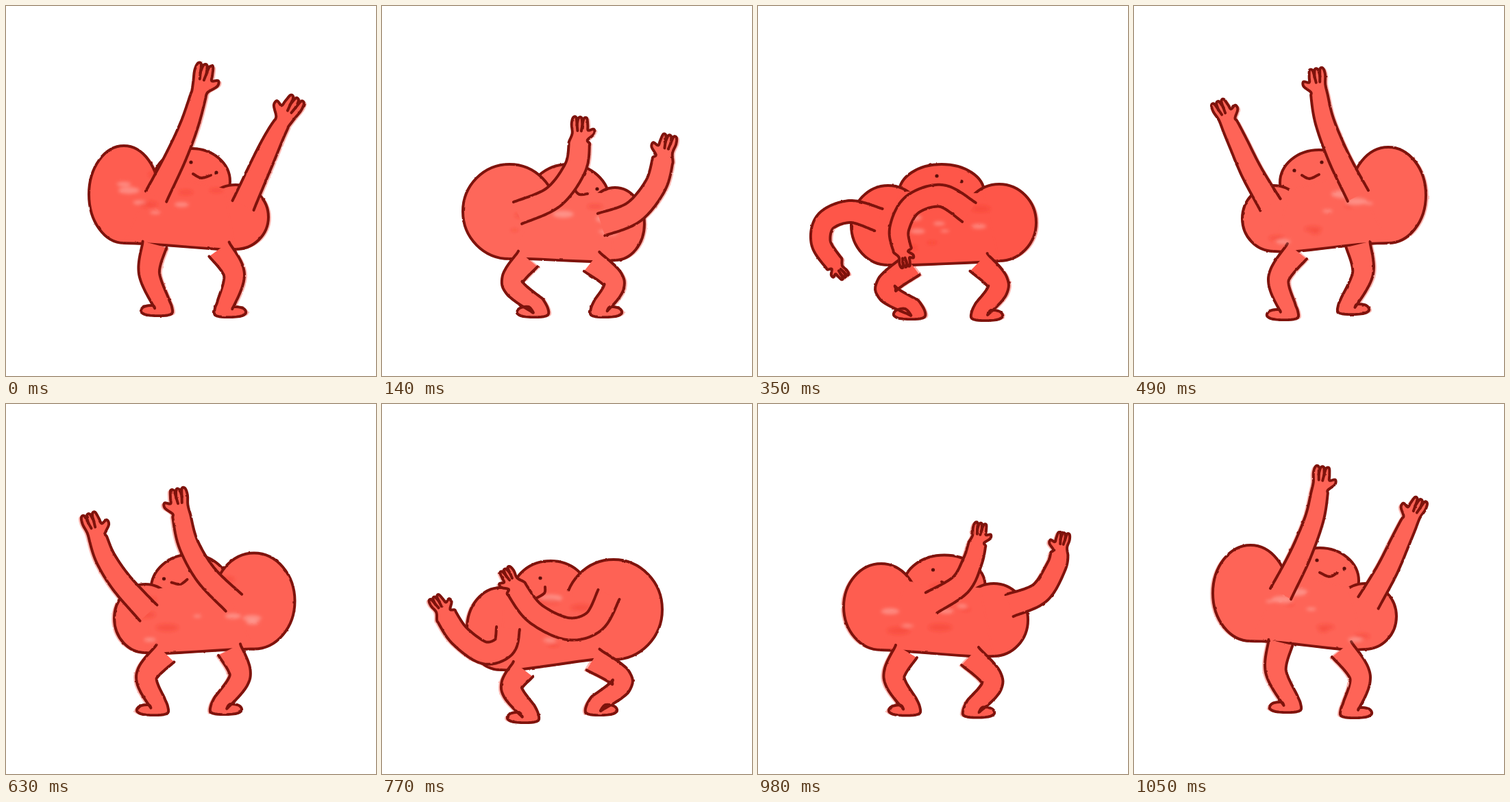
An HTML page that plays this animation: 540x540 px, repeating every 1120 ms.

```html
<!DOCTYPE html>
<html lang="en">
<head>
<meta charset="utf-8">
<title>Dancer</title>
<style>
  html, body { margin: 0; width: 100%; height: 100%; overflow: hidden; background: #fff; }
  svg { display: block; width: 540px; height: 540px; }
  #dancer { animation: flip 1120ms step-end infinite; }
  .pose { visibility: hidden; animation: show 560ms step-end infinite; }
  .ink { stroke: #7e130c; stroke-width: 4; stroke-linecap: round; stroke-linejoin: round; }
  .line { fill: none; }
  .wash { opacity: .45; }
  .light { fill: #fff; opacity: .28; }
  .deep { fill: #ee2e1e; opacity: .3; }
  @keyframes show { 0% { visibility: visible; } 12.5%, 100% { visibility: hidden; } }
  @keyframes flip { 0% { transform: none; } 50%, 100% { transform: translateX(541px) scaleX(-1); } }
</style>
</head>
<body>
<svg viewBox="0 0 540 540">
  <defs>
    <filter id="rough" filterUnits="userSpaceOnUse" x="0" y="0" width="540" height="540" color-interpolation-filters="sRGB">
      <feTurbulence type="fractalNoise" baseFrequency=".12" numOctaves="2" seed="4"/>
      <feDisplacementMap in="SourceGraphic" scale="2" xChannelSelector="R" yChannelSelector="G"/>
    </filter>
    <filter id="soft" x="-50%" y="-50%" width="200%" height="200%"><feGaussianBlur stdDeviation="2.5"/></filter>
  </defs>
  <g filter="url(#rough)"><g id="dancer"></g></g>
</svg>
<script>
// head, left, right: ellipses as cx, cy, rx, ry. chest: the two upper corners of the trunk.
// Arms run shoulder to wrist, legs hip to ankle, as x, y along the middle of the limb.
const up = {
  tone: 93, wrist: 11, hand: 1,
  head: [271, 256, 56, 48], left: [172, 275, 51, 71], right: [335, 308, 48, 47], chest: [218, 245, 318, 268],
  armL: [219, 278, 248, 220, 268, 172, 282, 126], armR: [346, 291, 376, 224, 392, 190, 403, 170],
  legL: [217, 348, 209, 390, 228, 436], legR: [311, 355, 333, 392, 319, 438],
  eyes: [270, 228, 307, 243], mouth: [273, 245, 285, 251, 299, 247]
};
const squat = {
  tone: 103, wrist: 15, hand: .88,
  head: [272, 285, 60, 54], left: [186, 300, 68, 69], right: [340, 318, 43, 53], chest: [238, 268, 325, 275],
  armL: [198, 302, 250, 279, 282, 236, 288, 199], armR: [320, 319, 367, 301, 399, 262, 410, 224],
  legL: [213, 369, 190, 405, 228, 438], legR: [306, 373, 339, 404, 319, 438],
  eyes: [275, 258, 314, 267], mouth: [280, 267, 288, 275, 300, 274]
};
const scoop = {
  tone: 98, wrist: 15, hand: .75,
  head: [295, 275, 55, 46], left: [203, 300, 71, 73], right: [368, 328, 49, 60], chest: [266, 275, 362, 270],
  armL: [210, 278, 231, 317, 270, 328, 318, 305, 346, 268], armR: [357, 327, 363, 354, 392, 363, 428, 338, 448, 308],
  legL: [233, 373, 190, 405, 229, 438], legR: [335, 387, 352, 415, 327, 449],
  eyes: [310, 254, 348, 258], mouth: [303, 267, 304, 276, 315, 283]
};
const low = {
  tone: 86, wrist: 13, hand: .58,
  head: [268, 272, 62, 41], left: [190, 320, 54, 58], right: [352, 316, 54, 56], chest: [206, 272, 330, 275],
  armL: [176, 312, 135, 300, 99, 314, 92, 346, 112, 377], armR: [308, 301, 268, 277, 225, 290, 206, 326, 211, 357],
  legL: [225, 378, 186, 413, 229, 441], legR: [322, 374, 351, 408, 326, 443],
  eyes: [261, 248, 297, 256], mouth: [255, 272, 265, 277, 276, 273]
};
const rise = {
  tone: 100, wrist: 12, hand: .88,
  head: [270, 258, 57, 48], left: [204, 310, 46, 48], right: [371, 276, 55, 70], chest: [228, 268, 320, 245],
  armL: [199, 290, 172, 243, 152, 200, 139, 172], armR: [327, 277, 299, 222, 278, 168, 270, 128],
  legL: [238, 358, 211, 398, 225, 442], legR: [327, 348, 334, 390, 312, 434],
  eyes: [234, 240, 274, 228], mouth: [245, 247, 256, 252, 270, 246]
};

const lerp = (a, b, t) => a + (b - a) * t;

// Halfway pose between two others
function between(a, b) {
  const half = (v, w) => Array.isArray(v) ? v.map((n, i) => lerp(n, w[i], .5)) : lerp(v, w, .5);
  return Object.fromEntries(Object.keys(a).map(key => [key, half(a[key], b[key])]));
}

const poses = [
  up,
  between(up, squat),
  squat,
  scoop,
  { ...between(scoop, low), armL: [196, 288, 178, 325, 186, 358, 216, 372], armR: [362, 298, 346, 334, 322, 352, 309, 366] },
  low,
  { ...between(rise, low), armL: [174, 294, 130, 276, 106, 238, 101, 218], armR: [288, 290, 246, 264, 228, 230, 221, 204] },
  rise
];

const pairs = flat => flat.flatMap((n, i) => i % 2 ? [] : [[n, flat[i + 1]]]);

// Points along a Catmull-Rom spline
function spline(p, steps) {
  const out = [p[0]];
  for (let i = 0; i < p.length - 1; i++) {
    const a = p[i - 1] || p[i], b = p[i], c = p[i + 1], d = p[i + 2] || c;
    for (let s = 1; s <= steps; s++) {
      const t = s / steps;
      out.push(b.map((v, k) => v + t / 2 * (c[k] - a[k]
        + t * (2 * a[k] - 5 * v + 4 * c[k] - d[k] + t * (3 * v - a[k] - 3 * c[k] + d[k])))));
    }
  }
  return out;
}

const curve = p => 'M' + spline(p, 4).join('L');
const line = p => `<path class="ink line" d="${curve(p)}"/>`;
const ellipse = ([cx, cy, rx, ry], more = '') =>
  `<ellipse cx="${cx}" cy="${cy}" rx="${rx}" ry="${ry}" ${more}/>`;

// Outline of a tapering limb: down one side, round the tip, back up the other
function limb(flat, w0, w1, side, tip) {
  const mid = spline(pairs(flat), 6), end = mid.length - 1;
  const angle = i => {
    const a = mid[Math.max(i - 1, 0)], b = mid[Math.min(i + 1, end)];
    return Math.atan2(b[1] - a[1], b[0] - a[0]);
  };
  const edge = sign => mid.map(([x, y], i) => {
    const w = lerp(w0, w1, i / end) * sign;
    return [x - Math.sin(angle(i)) * w, y + Math.cos(angle(i)) * w];
  });
  return [...edge(side), ...tip(mid[end], angle(end)), ...edge(-side).reverse()];
}

// Three fingers and a thumb; u points along the arm, v across it
function arm(flat, pose, thumb) {
  let creases = '';
  const hand = ([x, y], a) => {
    const put = ([u, v]) => {
      u *= pose.hand;
      v *= pose.hand * thumb;
      return [x + u * Math.cos(a) - v * Math.sin(a), y + u * Math.sin(a) + v * Math.cos(a)];
    };
    const tips = [[14, -13]];
    for (const v of [-11, -2, 7]) {
      tips.push([29, v - 4.5], [40, v - 3], [41, v + 2], [29, v + 4.5]);
      if (v < 7) creases += line([[29, v + 4.5], [19, v * .7 + 3]].map(put));
    }
    return [...tips, [21, 13], [24, 22], [16, 23], [5, 13]].map(put);
  };
  return { outline: limb(flat, 17, pose.wrist, -thumb, hand), creases };
}

function leg(flat, toe) {
  const sole = [[14, 1], [27, 3], [31, 10], [22, 15], [0, 16], [-14, 13], [-14, 3]];
  return limb(flat, 18, 12, -toe, ([x, y]) => sole.map(([u, v]) => [x + u * toe, y + v]));
}

let seed = 11;
const random = () => (seed = seed * 16807 % 2147483647) / 2147483647;

// Streaks of thin and thick paint scattered between the two sides of the body
function paint({ left, right }) {
  let out = '';
  for (let k = 0; k < 9; k++) {
    const t = random(), size = 5 + 12 * random();
    const spot = [lerp(left[0], right[0], t), lerp(left[1], right[1], t) + 80 * (random() - .5), size, size / 3];
    out += ellipse(spot, `class="${k < 5 ? 'light' : 'deep'}"`);
  }
  return `<g filter="url(#soft)">${out}</g>`;
}

function draw(pose, i) {
  const color = `rgb(254 ${pose.tone} ${pose.tone - 13})`;
  const { head, left, right } = pose;
  const arms = [arm(pose.armL, pose, 1), arm(pose.armR, pose, -1)];
  const legs = [leg(pose.legL, -1), leg(pose.legR, 1)];
  const [chestL, chestR] = pairs(pose.chest);
  const under = ([cx, cy, , ry]) => [cx, cy + ry];
  const belly = [under(left), pose.legL.slice(0, 2), pose.legR.slice(0, 2), under(right)];
  const shape = p => `<path class="ink" d="${curve(p)}"/>`;
  const wash = [...legs, ...arms.map(a => a.outline)].map(p => `<path d="${curve(p)}"/>`).join('');

  return `<g class="pose" fill="${color}" style="animation-delay:${i * 70 - 560}ms">
    <g class="wash" transform="translate(4 1)">${ellipse(left)}${ellipse(right)}${wash}</g>
    ${[head, left, right].map(e => ellipse(e, 'class="ink"')).join('')}
    <path d="${curve(belly)}L${chestR}L${chestL}Z" stroke="${color}" stroke-width="3"/>
    ${line(belly)}${legs.map(shape).join('')}${paint(pose)}
    ${pairs(pose.eyes).map(([x, y]) => ellipse([x, y, 2.6, 2.6], 'fill="#5e0f0a"')).join('')}
    ${line(pairs(pose.mouth))}
    ${arms.map(a => shape(a.outline) + a.creases).join('')}
  </g>`;
}

document.getElementById('dancer').innerHTML = poses.map(draw).join('');
</script>
</body>
</html>
```
